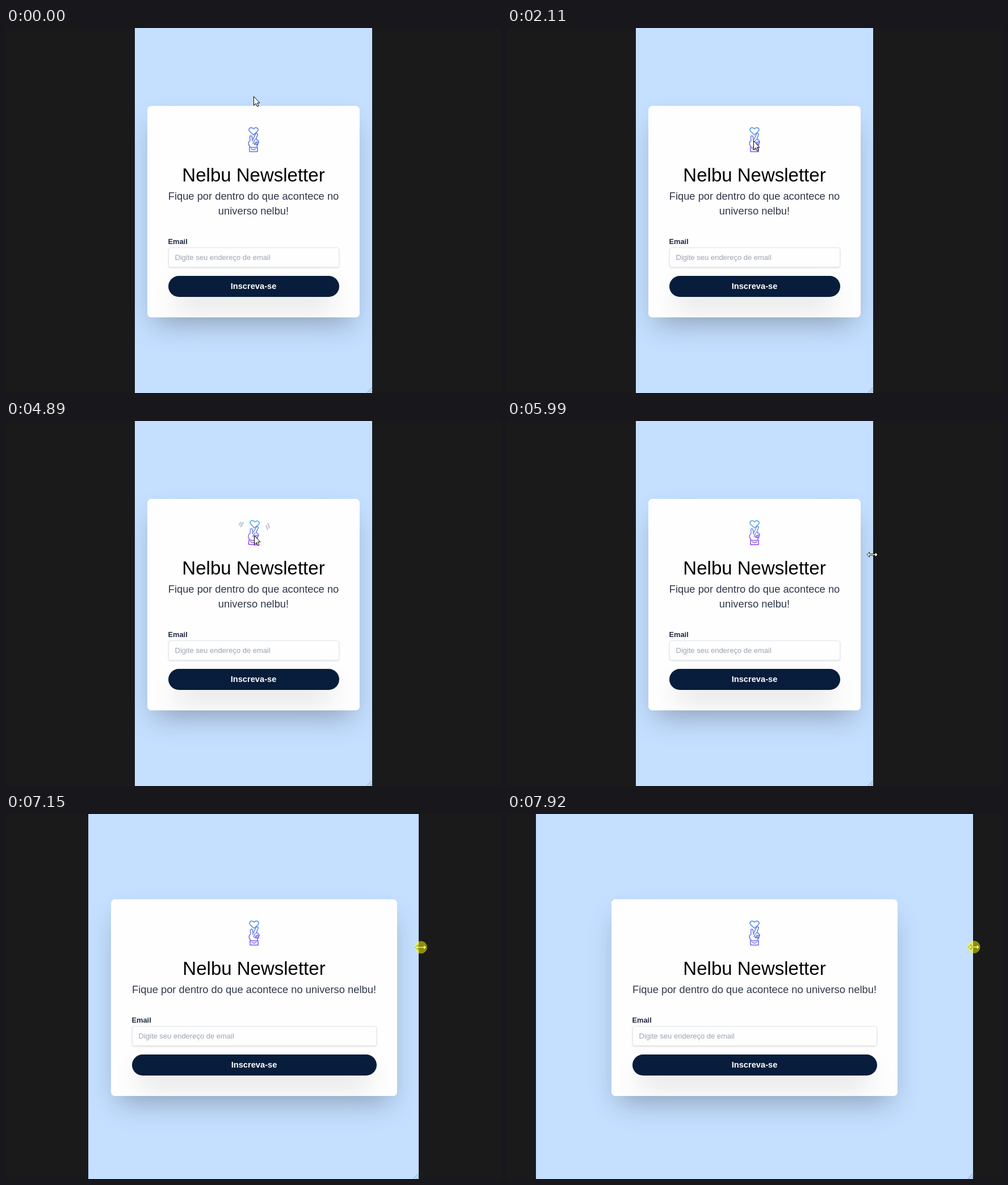
Write an HTML page that moves like this. It is 872 px wide and 642 px high and loops after 7990 ms.

```html
<!DOCTYPE html>
<html lang="pt">
<head>
<meta charset="utf-8">
<title>Newsletter</title>
<style>
  html, body { margin: 0; width: 100%; height: 100%; overflow: hidden; background: #1a1a1b; }
  body { --shadow: 0 23px 46px -11px rgba(0, 0, 0, .25); position: relative; font-family: "Liberation Sans", Arial, sans-serif; }
  #panel { position: absolute; top: 0; height: 646px; background: #c4dfff; display: grid; place-items: center; overflow: hidden; }
  #card { position: relative; box-sizing: border-box; padding: 36.5px; background: #fefefe; border-radius: 7px; text-align: center; box-shadow: var(--shadow); }
  #icon { display: block; width: 60px; height: 45px; margin: 0 auto; overflow: visible; }
  h1 { margin: 21.5px -9px 0; font-size: 33px; font-weight: 400; line-height: 37px; color: #000; white-space: nowrap; }
  p { margin: 6px -2px 0; font-size: 18.33px; line-height: 26px; color: #2d3748; }
  .label { margin-top: 31px; font-size: 12.83px; font-weight: 700; line-height: 20px; text-align: left; color: #1e2a42; }
  .field { box-sizing: border-box; height: 35px; padding-left: 11px; border: 1px solid #e2e6ec; border-radius: 4px; font-size: 13px; line-height: 33px; text-align: left; color: #9ca3af; box-shadow: 0 1px 3px rgba(0, 0, 0, .14); }
  .button { height: 36.5px; margin-top: 15px; border-radius: 19px; background: #071d3b; color: #fff; font-size: 14.67px; font-weight: 700; line-height: 37px; box-shadow: var(--shadow); }
  #overlay { position: absolute; left: 0; top: 0; }
</style>
</head>
<body>
<div id="panel">
  <div id="card">
    <svg id="icon" viewBox="-30 -26 60 45" fill="none" stroke-linecap="round" stroke-linejoin="round">
      <linearGradient id="ink" gradientUnits="userSpaceOnUse" x1="0" y1="-24" x2="0" y2="17">
        <stop id="inkTop"/><stop id="inkBottom" offset="1"/>
      </linearGradient>
      <g id="hand">
        <g stroke="url(#ink)" stroke-width="1.5">
          <path d="M0-12-6.8-18.2C-10.5-22-5.5-27.5 0-22.8 5.5-27.5 10.5-22 6.8-18.2Z"/>
          <path d="M-1-4 3.5-13.5C5-16 8-14.5 7-12L4-4"/>
          <path d="M-2-1-2.5-8C-3-11.5-6.5-11-6.5-8L-6-2C-9 0-9.8 4-7.5 7L-6 9.5"/>
          <path d="M4-4C7-4 10-1 9 1 7 3 9 5 6 7V9.5M-1 3 2-3M2 4C2 1 5 0 5 2S2 6 1 4M5 2C6-1 9 0 8 2S6 6 4.5 5"/>
          <path d="M-7 10H7V17.5H-7ZM-4 12.5Q0 15.5 4 12.5"/>
        </g>
        <g id="marks" stroke="#c3cad6" stroke-width="2.6">
          <path d="M-21-19-24-12M-25-19-27-15"/>
          <path d="M21-18 24-12M24-22 27-15"/>
        </g>
      </g>
    </svg>
    <h1>Nelbu Newsletter</h1>
    <p>Fique por dentro do que acontece no universo nelbu!</p>
    <div class="label">Email</div>
    <div class="field">Digite seu endereço de email</div>
    <div class="button">Inscreva-se</div>
  </div>
</div>
<svg id="overlay" width="872" height="642">
  <path id="grip" d="M-9 641.5 0 632.5M-4 641.5 0 637.5" stroke="#8091a6" fill="none"/>
  <g id="cursor" fill="#fff" stroke="#000">
    <path id="arrow" d="M.5.5V16.2L4.2 12.8 6.6 18.2 9 17.1 6.6 11.8H11Z"/>
    <path id="resize" stroke-width=".9" d="M-9.5 0-5-4.5V-1.2H5V-4.5L9.5 0 5 4.5V1.2H-5V4.5Z"/>
    <circle id="press" r="11" fill="#ff0" fill-opacity=".5" stroke="none"/>
  </g>
</svg>
<script>
const $ = id => document.getElementById(id);
const { PI, sin, min, max, round } = Math;
const LOOP = 7990, STAGE = 872;
const RESIZE = 5790, PRESS = 6390, DRAG = 6520, DRAG_END = 7920;

// Pointer legs: start, end, then where it arrives.
const legs = [
  [459, 460, 436, 121], [760, 1100, 468, 150], [1100, 1560, 434, 198],
  [2300, 3090, 487, 190], [3300, 3930, 437, 201], [4960, 5640, 635, 233]
];

const ramp = (t, start, end) => max(0, min(1, (t - start) / (end - start)));
const ease = k => k * k * (3 - 2 * k);
const show = (id, on) => $(id).setAttribute('visibility', on ? 'visible' : 'hidden');
const move = (el, x, y = 0) => el.setAttribute('transform', `translate(${x} ${y})`);

function pointer(t) {
  return legs.reduce(([x, y], [start, end, toX, toY]) => {
    const k = ease(ramp(t, start, end));
    return [x + (toX - x) * k, y + (toY - y) * k];
  }, [436, 120]);
}

// Two hovers, each playing the shake twice.
function drawHand(t) {
  const hover = t - (t < 3370 ? 960 : 3370), length = 1130;
  const p = hover > 0 && hover < 2 * length ? hover / length % 1 : 0;
  const strength = sin(PI * p);
  $('hand').setAttribute('transform', `rotate(${-9 * sin(5 * PI * p) * strength})`);
  $('marks').setAttribute('opacity', max(0, min(1, strength * 2 - .4)));
  [...$('marks').children].forEach((mark, i) => move(mark, (i * 2 - 1) * (strength - 1) * 4));

  const fadeIn = 1 - (1 - ramp(t, 300, 5640)) ** 2;
  const spread = 100 * (fadeIn - .65 * ramp(t, DRAG, 7500));
  const mix = color => `color-mix(in srgb, ${color} ${spread}%, #5873e8)`;
  $('inkTop').style.stopColor = mix('#30acde');
  $('inkBottom').style.stopColor = mix('#963cf0');
}

function draw(t) {
  const drag = ramp(t, DRAG, DRAG_END);
  const edge = round(645 + 176 * drag + 8.4 * sin(2 * PI * drag));
  const width = 2 * edge - STAGE;
  $('panel').style.left = STAGE - edge + 'px';
  $('panel').style.width = width + 'px';
  $('card').style.width = min(width - 44, 504) + 'px';
  $('card').style.left = drag > 0 && drag < 1 ? '1px' : 0;
  move($('grip'), edge);

  const resizing = t >= RESIZE;
  const [x, y] = resizing
    ? [edge - 1.5 + 3 * drag + 4 * sin(PI * drag), 235 - drag]
    : pointer(t);
  move($('cursor'), x, y);
  show('arrow', !resizing);
  show('resize', resizing);
  show('press', t >= PRESS);
  drawHand(t);
}

function tick() {
  draw(performance.now() % LOOP);
  requestAnimationFrame(tick);
}
tick();
</script>
</body>
</html>
```
